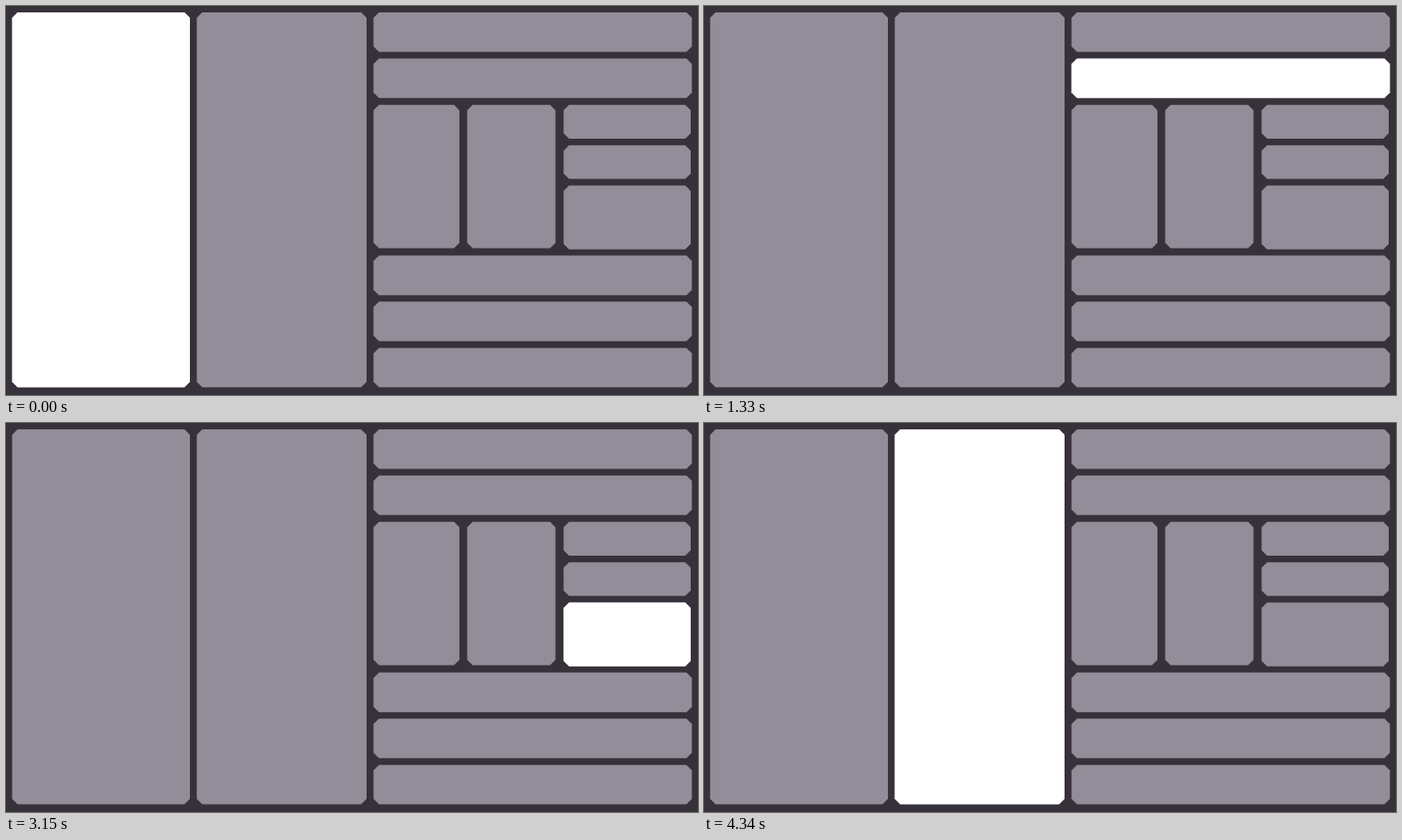
Write an HTML page that moves like this. It is 760x428 px and loops after 4690 ms.

```html
<!DOCTYPE html>
<html lang="en">
<head>
<meta charset="utf-8">
<title>Panel highlight loop</title>
<style>
  html, body { margin: 0; width: 100%; height: 100%; overflow: hidden; background: #37313a; }
  .stage { position: relative; width: 760px; height: 428px; overflow: hidden; }

  /* Each panel is a chamfered box given by left, top, right and bottom */
  .stage i {
    --c: 6px;
    position: absolute;
    inset: 0;
    background: #938c99;
    clip-path: polygon(
      calc(var(--l) + var(--c)) var(--t), calc(var(--r) - var(--c)) var(--t),
      var(--r) calc(var(--t) + var(--c)), var(--r) calc(var(--b) - var(--c)),
      calc(var(--r) - var(--c)) var(--b), calc(var(--l) + var(--c)) var(--b),
      var(--l) calc(var(--b) - var(--c)), var(--l) calc(var(--t) + var(--c)));
  }
  .stage .lit { background: #fff; animation: hop 4690ms step-end infinite; }

  @keyframes hop {
    0%      { --l: 6.7px;   --t: 7px;     --r: 202px;   --b: 419.6px; }
    7.462%  { --l: 209.5px; --t: 7px;     --r: 396px;   --b: 419.6px; }
    22.388% { --l: 403.6px; --t: 7px;     --r: 753.3px; --b: 50.6px; }
    28.358% { --l: 403.6px; --t: 57.8px;  --r: 753.3px; --b: 101.3px; }
    40.298% { --l: 403.6px; --t: 108.8px; --r: 498px;   --b: 266.6px; }
    44.776% { --l: 506.5px; --t: 108.8px; --r: 603.5px; --b: 266.6px; }
    56.716% { --l: 612.4px; --t: 108.8px; --r: 752px;   --b: 146px; }
    62.686% { --l: 612.4px; --t: 153.2px; --r: 752px;   --b: 190.2px; }
    67.164% { --l: 612.4px; --t: 197.6px; --r: 752px;   --b: 267.8px; }
    73.134% { --l: 403.6px; --t: 274.4px; --r: 753.3px; --b: 318.2px; }
    86.567% { --l: 403.6px; --t: 325.3px; --r: 753.3px; --b: 368.7px; }
    92.537%, 100% { --l: 209.5px; --t: 7px; --r: 396px; --b: 419.6px; }
  }
</style>
</head>
<body>
<div class="stage">
  <i style="--l:6.7px;--t:7px;--r:202px;--b:419.6px"></i>
  <i style="--l:209.5px;--t:7px;--r:396px;--b:419.6px"></i>
  <i style="--l:403.6px;--t:7px;--r:753.3px;--b:50.6px"></i>
  <i style="--l:403.6px;--t:57.8px;--r:753.3px;--b:101.3px"></i>
  <i style="--l:403.6px;--t:108.8px;--r:498px;--b:266.6px"></i>
  <i style="--l:506.5px;--t:108.8px;--r:603.5px;--b:266.6px"></i>
  <i style="--l:612.4px;--t:108.8px;--r:752px;--b:146px"></i>
  <i style="--l:612.4px;--t:153.2px;--r:752px;--b:190.2px"></i>
  <i style="--l:612.4px;--t:197.6px;--r:752px;--b:267.8px"></i>
  <i style="--l:403.6px;--t:274.4px;--r:753.3px;--b:318.2px"></i>
  <i style="--l:403.6px;--t:325.3px;--r:753.3px;--b:368.7px"></i>
  <i style="--l:403.6px;--t:376.2px;--r:753.3px;--b:419.6px"></i>
  <i class="lit"></i>
</div>
</body>
</html>
```
